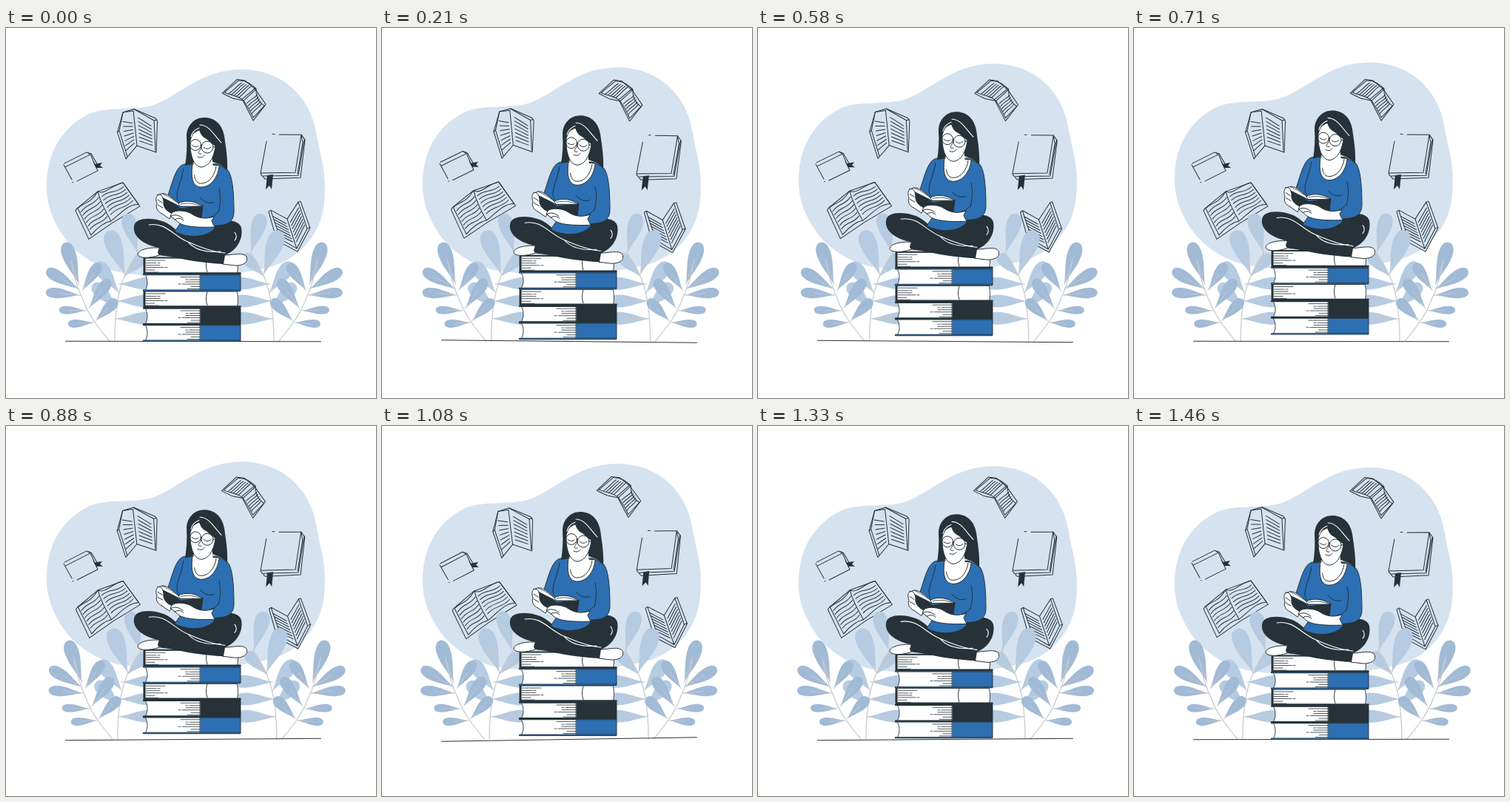
An HTML page with a canvas for the animation above (1500 ms loop, 500 by 500 pixels).

```html
<!DOCTYPE html>
<html lang="en">
<head>
<meta charset="utf-8">
<title>Reading on a stack of books</title>
<style>
html, body { margin: 0; width: 100%; height: 100%; overflow: hidden; background: #fff; }
canvas { display: block; width: 500px; height: 500px; }
</style>
</head>
<body>
<canvas id="stage" width="500" height="500"></canvas>
<script>
const ctx = document.getElementById('stage').getContext('2d');
const DARK = '#263238', BLUE = '#2d6fb3', SKY = '#d5e2f0', WHITE = '#fff';
const LEAF_BACK = '#b5cbe2', LEAF_FRONT = '#a1bad6', STEM = '#c9cbcd';
const LOOP = 1500, STEPS = 36;
ctx.lineCap = ctx.lineJoin = 'round';

function shape(d, fill, stroke, width = 1) {
  const path = new Path2D(d);
  if (fill) { ctx.fillStyle = fill; ctx.fill(path); }
  if (stroke) { ctx.strokeStyle = stroke; ctx.lineWidth = width; ctx.stroke(path); }
}
const line = (d, color = DARK, width = 1) => shape(d, null, color, width);

function moved(draw, dx, dy, angle = 0, cx = 0, cy = 0) {
  ctx.save();
  ctx.translate(cx + dx, cy + dy);
  ctx.rotate(angle * Math.PI / 180);
  ctx.translate(-cx, -cy);
  draw();
  ctx.restore();
}

// Linear interpolation through evenly spaced keys, p in 0..1
function keyed(keys, p) {
  const x = p * (keys.length - 1), i = Math.floor(x);
  return keys[i] + (keys[i + 1] - keys[i]) * (x - i);
}

function blob() {
  shape(`M318 56 C370 56 402 88 414 122 C420 140 421 155 425 170 C431 195 432 215 430 235
    C427 275 400 310 360 322 C300 338 220 338 175 333 C130 330 102 310 84 290
    C62 262 54 235 55 212 C55 165 80 130 115 115 C140 106 170 112 196 105
    C232 94 262 56 318 56Z`, SKY);
}

function leaf(x, y, tipX, tipY, w, color) {
  const len = Math.hypot(tipX - x, tipY - y), h = w / 2;
  ctx.save();
  ctx.translate(x, y);
  ctx.rotate(Math.atan2(tipY - y, tipX - x));
  shape(`M0 0 C${len * .28} ${-h * .3} ${len * .48} ${-h} ${len * .74} ${-h}
    C${len * .92} ${-h} ${len} ${-h * .55} ${len} 0 C${len} ${h * .55} ${len * .92} ${h} ${len * .74} ${h}
    C${len * .48} ${h} ${len * .28} ${h * .3} 0 0Z`, color);
  line(`M0 0H${len * .62}`, STEM, .8);
  ctx.restore();
}

function backPlant() {
  [[178, 304, 163, 251, 20], [161, 334, 139, 274, 23], [153, 358, 123, 317, 19],
   [160, 336, 188, 306, 16], [152, 346, 206, 345, 17], [149, 369, 204, 369, 17],
   [148, 393, 204, 392, 17], [150, 378, 118, 346, 18]
  ].forEach(l => leaf(...l, LEAF_BACK));
  line('M147 423 C147 385 152 350 164 328 C170 316 176 310 179 302', STEM, 1.3);
}

function frontPlant() {
  [[99, 347, 80, 290, 19], [99, 353, 55, 327, 16], [101, 361, 54, 357, 14],
   [109, 382, 72, 381, 11], [119, 398, 84, 400, 11], [103, 355, 127, 318, 15],
   [112, 379, 140, 340, 16], [121, 396, 150, 367, 15]
  ].forEach(l => leaf(...l, LEAF_FRONT));
  line('M140 423 C125 405 111 387 104 367 C96 350 91 332 88 315', STEM, 1.3);
}

function plants() {
  for (const plant of [backPlant, frontPlant]) {
    plant();
    ctx.save();
    ctx.translate(509, 0);
    ctx.scale(-1, 1);
    plant();
    ctx.restore();
  }
}

// Rows of text running from one page edge to the other
function rows(n, a, b, c, d, bend = 0) {
  for (let i = 1; i <= n; i++) {
    const k = i / (n + 1);
    const x1 = a[0] + (b[0] - a[0]) * k, y1 = a[1] + (b[1] - a[1]) * k;
    const x2 = c[0] + (d[0] - c[0]) * k, y2 = c[1] + (d[1] - c[1]) * k;
    const dx = x2 - x1, dy = y2 - y1;
    line(`M${x1} ${y1} C${x1 + dx * .35} ${y1 + dy * .35 - bend} ${x1 + dx * .65} ${y1 + dy * .65 + bend} ${x2} ${y2}`);
  }
}

function flyingBooks() {
  // large open book, left
  shape('M94 247 L112 285.5 L143 264 L181 241 L176 234 L158 209 L124 221 L96 244Z', SKY, DARK);
  line('M97 244 C106 235 113 239 124 221 C134 226 145 211 158 209 L179 238 C164 239 156 250 142 261 C135 262 124 269 115 280Z M124 221 C128 236 135 249 142 261');
  rows(6, [99, 244], [116, 277], [123, 224], [139, 260], 5);
  rows(6, [127, 223], [144, 257], [156, 211], [174, 237], 5);

  // standing open book, top left
  shape('M158 114 L173 109.5 L202 122 L204.5 126 L203 168 L177 159 L162 177 L150.5 141Z', SKY, DARK);
  line('M158 114 L153 139 L164 174 M158 114 L172 112 L177 159 M173 110 L200 125 L202 166 M200 125 L204 124 M153 139 L150.5 141');
  rows(7, [157, 120], [163, 172], [170, 124], [174, 160]);
  rows(7, [178, 116], [181, 158], [196, 128], [198, 163]);

  // small closed book, left
  line('M79 183 L109 168 L114 171 L80 188 M78 185 L89 205 M114 171 L124 193 L96 207 M109 168 L115 170 L125 187 M90 208.5 l1 .4 M118 181 L123 191');
  shape('M119 184 L130 182 L127 186 L131 189 L122 189Z', DARK);

  // open book, top right
  shape('M292 88 L312 69.5 L323 71 L337 83 L351 103 L334 125 L320 98 L306 95Z', SKY, DARK);
  line('M295 87 L314 71 C324 70 331 76 338 82 C334 87 326 93 321 98 C314 91 306 92 295 87 M338 82 C337 94 343 101 349 105 L334 121 C330 112 325 104 321 98 M319 96 L337 81');
  rows(5, [298, 87], [318, 95], [315, 73], [334, 80], -1);
  rows(5, [324, 98], [334, 119], [338, 87], [347, 105], 2);

  // closed book, right
  line('M360 143.5 H363 M369 144 H399 L391 195 L344 196 L352 153 M399 144 L404 151 L398 202 L350 204 L344 197 M403 151 L395 199 L348 200 M399 145 L401 155 L394 197');
  shape('M353 199 L361 198 L359 218 L356 213 L351 218Z', DARK);

  // standing open book, bottom right
  shape('M355 248 L358 246 L380 258 L395 235 L398 234 L411 270 L394 302 L366 287Z', SKY, DARK);
  line('M358 247 L371 285 L393 298 L380 258 M395 235 L407 271 L393 298 M407 271 L411 269 M371 285 L366 287');
  rows(7, [359, 250], [371, 284], [377, 260], [389, 293]);
  rows(7, [383, 258], [394, 293], [394, 239], [405, 270]);
}

function pageLines(y, right) {
  [0, 3.5, 6.5, 9.5, 13, 16].forEach((dy, i) => {
    const len = [26, 14, 19, 24, 12, 17][i];
    const x = right ? 262 - len : 189;
    line(`M${x} ${y + dy}h${len}`, DARK, .8);
    if (i === 1 || i === 3) line(`M${right ? x - 5 : x + len + 2} ${y + dy}h3`, DARK, .8);
  });
}

function spineLeft(y) {
  shape(`M187 ${y + 1} H312 C314 ${y + 8} 314 ${y + 17} 312 ${y + 23} H187Z`, WHITE, DARK, .9);
  line(`M187 ${y + 1} H312`, DARK, 2);
  line(`M187 ${y + 2} V${y + 21}`, DARK, 3);
  line(`M187 ${y + 22} H316.5`, DARK, 2.6);
  line(`M272 ${y + 2} C270 ${y + 8} 270 ${y + 15} 272 ${y + 20}`);
  pageLines(y + 4.5, false);
}

function spineRight(y, color) {
  shape(`M188 ${y} H264 V${y + 22} H188 C192 ${y + 15} 192 ${y + 7} 188 ${y}Z`, WHITE, DARK, .9);
  shape(`M262.5 ${y} H317 V${y + 22} H262.5Z`, color, DARK, .9);
  line(`M186 ${y} H316 M186 ${y + 21.8} H316`, DARK, 2.4);
  if (color === BLUE) line(`M186 ${y} H316 M186 ${y + 21.8} H316`, BLUE, 1);
  pageLines(y + 3.5, true);
}

function stack() {
  spineRight(401, BLUE);
  spineRight(378.5, DARK);
  spineLeft(354.5);
  spineRight(333, BLUE);
  spineLeft(309.5);
}

function ring(x, y, r) {
  ctx.beginPath();
  ctx.arc(x, y, r, 0, 7);
  ctx.strokeStyle = DARK;
  ctx.lineWidth = 1;
  ctx.stroke();
}

function body() {
  // feet and legs
  shape('M207 297 C192 296 178 300 178 306 C180 312 195 311 207 307Z', WHITE, DARK);
  shape('M294 307 C306 307 321 302 325 309 C328 317 320 321 310 321 L293 319Z', WHITE, DARK);
  shape(`M173 268 C174 256 196 255 214 262 C224 266 230 275 241 279 C256 283 270 280 283 266
    C296 256 316 260 318 270 C321 286 311 301 296 307 L294 319 C270 318 240 313 222 309
    C212 307 206 309 205 303 L207 297 C186 293 171 282 173 268Z`, DARK);
  line('M193 266 C216 262 226 281 246 289 C264 297 281 303 296 304 M246 289 C258 303 277 303 290 302 M309 287 C312 284 312 279 309 276', WHITE, 1.1);

  // sweater
  shape(`M241 184 C230 186 226 205 219 226 L214 236 L237 262 L228 275 C245 284 268 284 281 272
    L283 267 C299 267 308 262 308 248 C308 222 306 194 297 190 L285 184Z`, BLUE, DARK);
  line('M288 217 C291 230 289 242 287 249 M287 248 C282 254 278 255 275 256 M240 190 C237 207 232 215 231 225 C231 231 232 233 234 235 M262 229 C268 236 276 238 281 235');
  shape('M252 184 C249 206 254 215 264 215 C277 215 287 201 288 186Z', WHITE, DARK);
  line('M255 185 C253 203 256 210 264 210 C274 210 282 200 284 187');
}

function head() {
  shape(`M268 121 C254 121 244 132 244 147 C245 160 244 173 242 186 L251 184 L256 180 L280 181
    C288 184 294 187 299 193 C300 178 297 160 295 146 C292 130 282 121 268 121Z`, DARK);
  shape('M254 176 L253 197 C256 202 272 201 280 190 L278 170Z', WHITE);
  shape('M249 150 C248 168 252 187 264 188 C275 187 281 174 283 160 C281 144 270 138 261 138 C255 140 250 144 249 150Z', WHITE, DARK);
  shape('M261 135 C253 139 251 148 248 156 L245 148 C246 135 255 124 268 123 C284 125 294 142 294 164 C280 161 274 151 269 149 C265 147 261 141 261 135Z', DARK);
  line('M261 135 C254 138 251 142 250 147 M262 131 C275 131 281 145 291 155', WHITE, 1.1);
  ring(256, 158, 7.4);
  ring(272, 161, 8);
  line('M263 159 C264 157 265 158 265 159 M280 161 L285 160 M251 158 C254 161 258 161 260 159 M267 161 C270 164 274 164 277 161 M264 160 C263 165 260 167 260 169 C261 170 262 170 264 170 M259 174 C263 176 266 175 268 172');
}

function reading() {
  // open book
  shape('M205 225 L211 226 L236 244 L266 240 L264 257 L240 256 L219 252Z', DARK, DARK);
  shape('M207 226 C212 219 224 228 233 237 C242 232 254 234 263 239 L264 241 L235 241 L211 229Z', WHITE, DARK);
  line('M211 224 C221 228 226 232 233 237 L235 241 M236 238 C246 236 254 237 262 240', DARK, .8);
  // hands
  shape('M208 225 C202 225 202 232 204 237 C202 242 204 248 211 251 L221 258 L225 251 C215 247 212 240 213 234 C212 229 211 226 208 225Z', WHITE, DARK);
  line('M205 232 L211 236 M205 239 L212 243');
  shape('M281 255 C268 259 259 257 249 250 C240 246 228 246 224 250 L222 254 L230 260 C236 268 254 270 282 269 L278 261Z', WHITE, DARK);
  line('M223 254 C230 251 235 254 239 257 M228 259 C232 256 237 257 240 260');
}

function girl() {
  body();
  head();
  reading();
}

const SHAKE = [0, -1, 2, -4, 4, -4, 4, -4, 2, -1, 0];
const WIND = [0, 1, 0, -1, 0];

function render(time) {
  const step = Math.floor(time / LOOP * STEPS + .1) % STEPS;
  const p = (step + .5) / STEPS;
  const lift = keyed([0.3, -9.7, 0.3], p), sway = keyed(SHAKE, p), tilt = keyed(WIND, p);

  ctx.fillStyle = WHITE;
  ctx.fillRect(0, 0, 500, 500);
  moved(blob, 0, lift);
  moved(flyingBooks, 0, 0, tilt, 243, 185);
  moved(plants, sway, 0);
  moved(() => line('M80.5 423.5 H425.5'), 0, 0, tilt, 253, 423.5);
  moved(() => { stack(); girl(); }, 0, lift);
}

const start = performance.now();
function tick() {
  render(performance.now() - start);
  requestAnimationFrame(tick);
}
tick();
</script>
</body>
</html>
```
